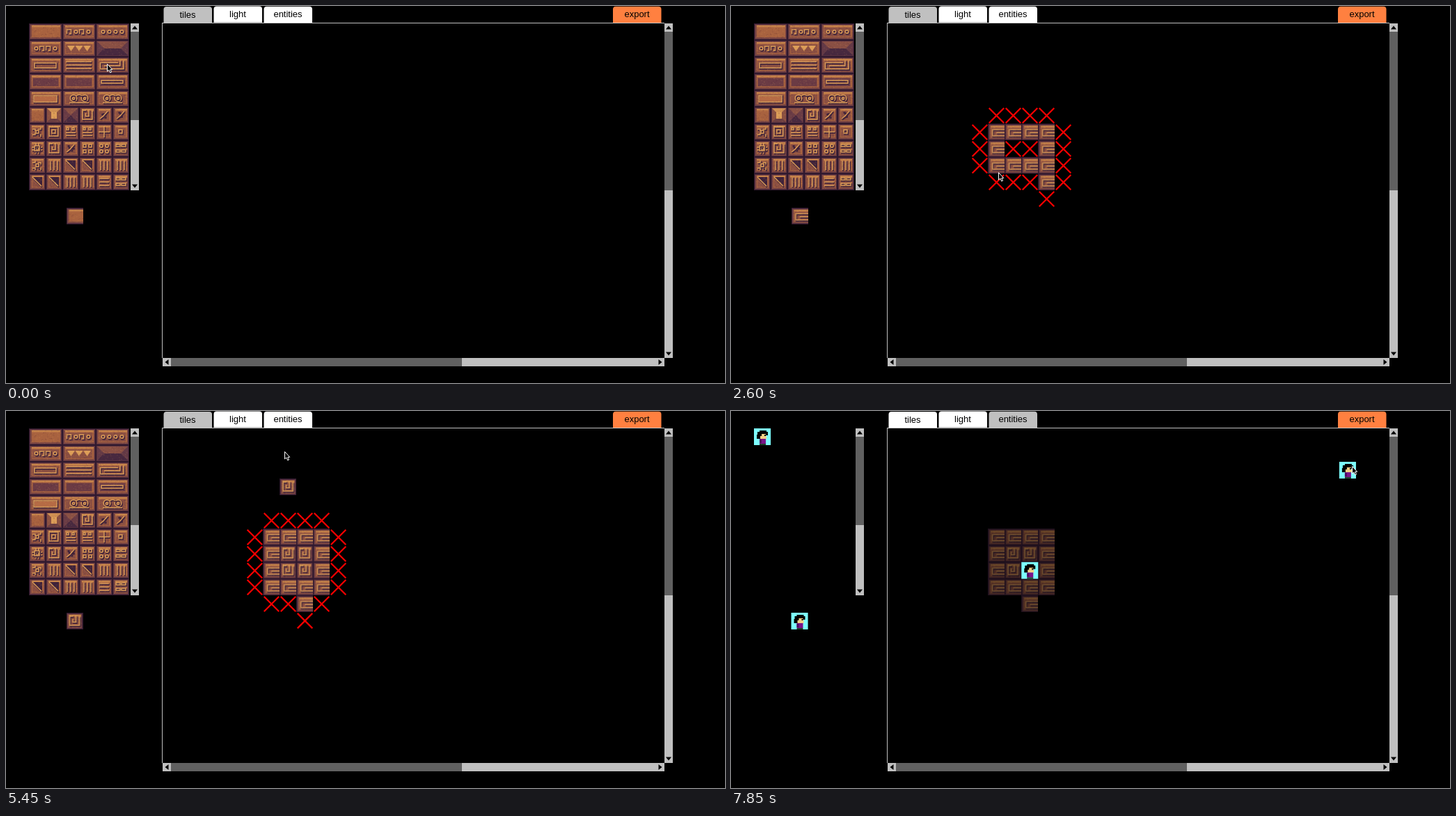
Recreate the animation shown at these times as an HTML page with a canvas. Size 1033 by 542 pixels, loop 8000 ms.

```html
<!DOCTYPE html>
<html lang="en">
<head>
<meta charset="utf-8">
<title>Level editor</title>
<style>
html, body { margin: 0; width: 100%; height: 100%; overflow: hidden; background: #000; }
canvas { display: block; }
</style>
</head>
<body>
<canvas id="stage" width="1033" height="542"></canvas>
<script>
const LOOP = 8000, TILE = 24, PITCH = 721 / 30;
const GRID = { x: 225, y: 25, w: 721, h: 480 };
const LIST = { x: 33, y: 25, w: 146, h: 240 };
const DARK = '#40233a', MID = '#6d3d46', RECESS = '#8c5042', BASE = '#a8623f', LIGHT = '#dc9d58';
const GREY = '#c0c0c0', THUMB = '#606060';

const ctx = document.getElementById('stage').getContext('2d');
const sheet = document.createElement('canvas');
sheet.width = 6 * TILE;
sheet.height = 10 * TILE;
const pen = sheet.getContext('2d');

// ---- tile sheet ----
let seed = 7;
const random = () => (seed = (seed * 16807) % 2147483647) / 2147483647;
const range = (n, f) => { for (let i = 0; i < n; i++) f(i); };

function rect(color, x, y, w, h) {
  pen.fillStyle = color;
  pen.fillRect(x, y, w, h);
}
function fill(color, d) {
  pen.fillStyle = color;
  pen.fill(new Path2D(d));
}
function carve(d) {
  const path = new Path2D(d);
  pen.lineWidth = 2.2;
  pen.strokeStyle = DARK;
  pen.translate(1, 1.4);
  pen.stroke(path);
  pen.translate(-1, -1.4);
  pen.lineWidth = 1.5;
  pen.strokeStyle = LIGHT;
  pen.stroke(path);
}
const box = (x, y, w, h = w) => carve(`M${x} ${y}h${w}v${h}h${-w}z`);
function ring(x, y, r) {
  const path = new Path2D();
  path.arc(x, y, r, 0, 7);
  carve(path);
}
const quad = f => range(4, i => f(8 + i % 2 * 8, 8 + (i >> 1) * 8));

function pyramid(w, s, top, side, front) {
  const a = w - s, b = TILE - s;
  fill(side, `M2 2H${w - 2}V22H2z`);
  fill(top, `M2 2H${w - 2}L${a} ${s}H${s}z`);
  fill(front, `M2 22L${s} ${b}H${a}L${w - 2} 22z`);
}
function beads(pattern) {
  [...pattern].forEach((c, i) => {
    const x = 10.5 + i * 9;
    if (c === 'o') ring(x, 12, 2.3);
    else carve(`M${x - 4} 15v-6h6v6h-3`);
  });
}
function horns() {
  range(2, i => {
    const x = 16 + i * 16;
    ring(x, 11.5, 4.8);
    ring(x, 12, 1.5);
  });
  carve('M20 8q4 -3 8 0M10 18h28');
}

const shapes = {
  plain() {},
  beadsA: () => beads('gogo'),
  beadsB: () => beads('oooo'),
  beadsC: () => beads('oggo'),
  teeth: () => range(3, i => fill(LIGHT, `M${7 + i * 11.5} 8h11l-5.5 8z`)),
  roof: () => pyramid(48, 12, '#8a5044', '#643a46', '#48293f'),
  frame: () => box(8, 9, 31, 7),
  lines: () => range(3, i => carve(`M5 ${7 + i * 5}h37`)),
  hook: () => carve('M32 8.5H6.5V17.5H40V5M12 13H35V5'),
  sunk: () => rect('#6b3b44', 6, 7, 36, 11),
  slot() { rect(MID, 6, 7, 36, 11); box(8, 10, 31, 4); },
  panel() { box(7, 8, 33, 9); rect('#b56b45', 8, 9, 31, 7); },
  horns,

  peak() { pyramid(24, 7, '#cf8f52', '#8a5041', '#6d3f42'); rect(LIGHT, 8, 7, 8, 10); },
  shade: () => pyramid(24, 12, '#8a5144', '#6a3c45', '#48293f'),
  spiral: () => carve('M10 5H5V18H19V5M14 4V13.5H9.5V9'),
  pits() {
    range(4, () => rect(DARK, 6 + random() * 9, 6 + random() * 9, 3, 3));
    carve('M6 17l5 -4l6 -7');
  },
  maze() { quad((x, y) => carve(`M${x - 3} ${y}h4v${random() < .5 ? 3 : -3}`)); box(10, 10, 4); },
  nest() { box(5, 5, 13); box(9, 9, 5); },
  face() { box(6, 6, 3); box(14, 6, 3); range(2, i => carve(`M5 ${13 + i * 4}h14`)); },
  cross: () => carve('M12 4v16M4 12h16'),
  core: () => box(9, 9, 5),
  chip() { range(2, i => carve(`M${10 + i * 4} 4v15M4 ${10 + i * 4}h15`)); box(8, 8, 7); },
  four: () => quad((x, y) => box(x - 2, y - 2, 4)),
  rings: () => quad((x, y) => ring(x, y, 2.3)),
  bricks: () => quad((x, y) => box(x - 3, y - 2, 6, 3)),
  slash() { fill(DARK, 'M5 5H19V19z'); carve('M5 5L18 18'); },
  slats: () => range(3, i => carve(`M${7 + i * 5} 5v14`)),
  planks: () => range(3, i => carve(`M5 ${7 + i * 5}h14`))
};

function addTile(name, x, y, w) {
  pen.save();
  pen.translate(x, y);
  rect('#30192e', 0, 0, w, 24);
  rect('#57303f', 1, 1, w - 2, 22);
  rect('#7f4942', 2, 2, w - 4, 20);
  rect(BASE, 4, 4, w - 7, 16);
  rect('#d3924f', 4, 3, w - 7, 1.5);
  rect('#b87246', 4, 4.5, w - 7, 1.5);
  if (name !== 'plain') rect(RECESS, 5, 6, w - 10, 13);
  shapes[name]();
  range(w * 1.6, () => {
    const tone = random() < .5 ? '255,190,110' : '50,20,50';
    rect(`rgba(${tone},.14)`, 2 + random() * (w - 5), 2 + random() * 19, 1.5, 1);
  });
  pen.restore();
}
function addTiles(names, w, top) {
  const across = sheet.width / w;
  names.split(' ').forEach((name, i) =>
    addTile(name, i % across * w, top + Math.floor(i / across) * TILE, w));
}
addTiles('plain beadsA beadsB beadsC teeth roof frame lines hook ' +
  'sunk sunk slot panel horns horns', 48, 0);
addTiles('plain peak shade spiral pits pits maze nest face face cross core ' +
  'chip spiral pits four rings bricks maze slats slash slash slats slats ' +
  'slash slash slats slats planks bricks', TILE, 5 * TILE);

// ---- session: pointer trail and painted pieces ----
const trail = [], placed = [];
const STEP = { l: [-1, 0], r: [1, 0], u: [0, -1], d: [0, 1] };

const move = (t, x, y) => trail.push({ t, x, y });
// paints from one cell along a walk of l, r, u, d, one cell per gap
function paint(t, gap, c, r, walk = '') {
  const mark = () => {
    placed.push({ t, c, r });
    move(t, GRID.x + (c + .5) * PITCH, GRID.y + (r + .55) * PITCH);
  };
  mark();
  for (const s of walk) {
    t += gap;
    c += STEP[s][0];
    r += STEP[s][1];
    mark();
  }
}

move(0, 145, 83);
move(100, 147, 70);
move(200, 145, 82);
move(700, 230, 128);
move(800, 308, 158);
move(850, 382, 177);
paint(1150, 100, 6, 6, 'r');
move(1600, 406, 182);
paint(1800, 75, 8, 6, 'rdddulllu');
move(2600, 384, 239);
paint(2750, 115, 6, 9, 'rrd');
move(3250, 438, 272);
move(3800, 178, 152);
move(3950, 152, 157);
move(4100, 118, 157);
move(4350, 121, 160);
paint(4900, 90, 7, 7, 'rdl');
move(5300, 402, 105);
move(5450, 400, 58);
move(5700, 392, 13);
move(6100, 385, 13);
move(6250, 150, 18);
move(6350, 23, 44);
move(6650, 46, 30);
move(6800, 44, 32);
move(7050, 400, 225);
paint(7450, 0, 8, 8);
move(7700, 880, 84);
move(7850, 892, 79);

function pointer(t) {
  const i = trail.findIndex(p => p.t > t);
  if (i < 0) return trail[trail.length - 1];
  const a = trail[i - 1], b = trail[i], k = (t - a.t) / (b.t - a.t);
  return { x: Math.round(a.x + (b.x - a.x) * k), y: Math.round(a.y + (b.y - a.y) * k) };
}

const PLAIN = [0, 0], HOOK = [4, 2], SPIRAL = [3, 5], HERO = null;
const ENTITIES_AT = 6100;
const brush = t => t < 250 ? PLAIN : t < 4200 ? HOOK : t < 6800 ? SPIRAL : HERO;

// the screen refreshes on a beat, quick at first, then slower
const snap = t => Math.round(t / 50) * 50;
function beat(t) {
  const gap = t < 1500 ? 50 : 134.6, base = t < 1500 ? 0 : 2605;
  const n = Math.ceil((Math.floor(t / 50) * 50 + 25 - base) / gap) - 1;
  return [snap(base + n * gap), snap(base + (n - 1) * gap)];
}

// ---- drawing ----
function block(color, x, y, w, h) {
  ctx.fillStyle = color;
  ctx.fillRect(x, y, w, h);
}
function tab(x, y, color, label) {
  ctx.fillStyle = color;
  ctx.beginPath();
  ctx.roundRect(x, y, 69.5, 23.3, [4, 4, 0, 0]);
  ctx.fill();
  ctx.fillStyle = '#000';
  ctx.fillText(label, x + 34.5, Math.round(y + 15.6));
}
function arrow(x, y, turn) {
  block(GREY, x, y, 12, 12);
  ctx.save();
  ctx.translate(x + 6, y + 6);
  ctx.rotate(turn * Math.PI / 2);
  ctx.fillStyle = '#000';
  ctx.fill(new Path2D('M-4 2.5L0 -2.5L4 2.5z'));
  ctx.restore();
}
function scrollV(x, y, h, split) {
  block(GREY, x, y, 12, h);
  block(THUMB, x, y + 12, 12, split - y - 12);
  arrow(x, y, 0);
  arrow(x, y + h - 12, 2);
}
function scrollH(x, y, w, split) {
  block(GREY, x, y, w, 12);
  block(THUMB, x + 12, y, split - x - 12, 12);
  arrow(x, y, 3);
  arrow(x + w - 12, y, 1);
}
function hero(x, y) {
  const part = (color, a, b, w, h) => block(color, x + a, y + b, w, h);
  part('#7dffff', 0, 0, PITCH, PITCH);
  part('#000', 8, 3, 10, 3);
  part('#000', 5, 5, 15, 5);
  part('#000', 4, 9, 7, 6);
  part('#f3cf86', 11, 8, 6, 3);
  part('#f3cf86', 9, 11, 9, 4);
  part('#000', 15, 9, 2, 2);
  part('#7a1488', 8, 15, 9, 7);
  part('#4b0d5c', 8, 16, 3, 5);
  part('#20402c', 8, 22, 9, 2);
}
function piece(kind, x, y) {
  if (!kind) return hero(x, y);
  ctx.drawImage(sheet, kind[0] * TILE, kind[1] * TILE, TILE, TILE, x, y, PITCH, PITCH);
}
function cellAt(p, area) {
  const x = p.x - area.x, y = p.y - area.y;
  if (x < 0 || y < 0 || x >= area.w || y >= area.h) return null;
  return { c: Math.floor(x / PITCH), r: Math.floor(y / PITCH) };
}
const gx = c => GRID.x + c * PITCH, gy = r => GRID.y + r * PITCH;

function crosses(cells) {
  const done = new Set(cells.map(p => p.c + ',' + p.r));
  ctx.strokeStyle = '#f00';
  ctx.lineWidth = 2.2;
  ctx.beginPath();
  for (const p of cells)
    for (const [dc, dr] of Object.values(STEP)) {
      const key = (p.c + dc) + ',' + (p.r + dr);
      if (done.has(key)) continue;
      done.add(key);
      const x = gx(p.c + dc), y = gy(p.r + dr);
      ctx.moveTo(x + 1.5, y + 1.5);
      ctx.lineTo(x + 23, y + 23);
      ctx.moveTo(x + 23, y + 1.5);
      ctx.lineTo(x + 1.5, y + 23);
    }
  ctx.stroke();
}
function cursor(p) {
  const shape = new Path2D('M0 0V10.5L2.4 8.4L4.2 12.4L6 11.6L4.3 7.8H7.2Z');
  ctx.save();
  ctx.translate(p.x + .5, p.y + .5);
  ctx.lineWidth = 1;
  ctx.strokeStyle = '#fff';
  ctx.fillStyle = '#000';
  ctx.fill(shape);
  ctx.stroke(shape);
  ctx.restore();
}
function chrome(entities) {
  ctx.font = '13px "Liberation Sans", Arial, sans-serif';
  ctx.textAlign = 'center';
  tab(226.5, 1, entities ? '#fff' : GREY, 'tiles');
  tab(298.5, .5, '#fff', 'light');
  tab(370.5, .7, entities ? GREY : '#fff', 'entities');
  tab(872, .7, '#ff8040', 'export');
  block(GREY, 224, 24, 722, 1);
  block(GREY, 224, 24, 1, 482);
  scrollV(946, 25, 481, 265);
  scrollH(225, 506, 721, 655);
  scrollV(179, 25, 240, 164);
}

function draw(t) {
  const [now, before] = beat(t);
  const entities = now >= ENTITIES_AT;
  const last = before < 0 ? { x: 0, y: 0 } : pointer(before);

  block('#000', 0, 0, 1033, 542);
  chrome(entities);

  if (entities) hero(LIST.x, LIST.y);
  else ctx.drawImage(sheet, LIST.x, LIST.y, 6 * PITCH, 10 * PITCH);
  const hover = cellAt(last, LIST);
  if (hover) {
    ctx.strokeStyle = '#fff';
    ctx.lineWidth = 1;
    ctx.strokeRect(32.5 + Math.min(5, hover.c) * PITCH, 25.5 + hover.r * PITCH, PITCH, PITCH);
  }
  piece(brush(now), 86.5, 290);

  const cells = placed.filter(p => p.t <= now);
  for (const p of cells) {
    piece(brush(p.t), gx(p.c), gy(p.r));
    if (entities && p.t < ENTITIES_AT) block('rgba(0,0,0,.46)', gx(p.c), gy(p.r), PITCH, PITCH);
  }
  if (!entities) crosses(cells);

  const ghost = cellAt(last, GRID);
  if (ghost) piece(brush(now), gx(ghost.c), gy(ghost.r));
  cursor(pointer(now));
}

const start = performance.now();
function tick() {
  draw((performance.now() - start) % LOOP);
  requestAnimationFrame(tick);
}
tick();
</script>
</body>
</html>
```
